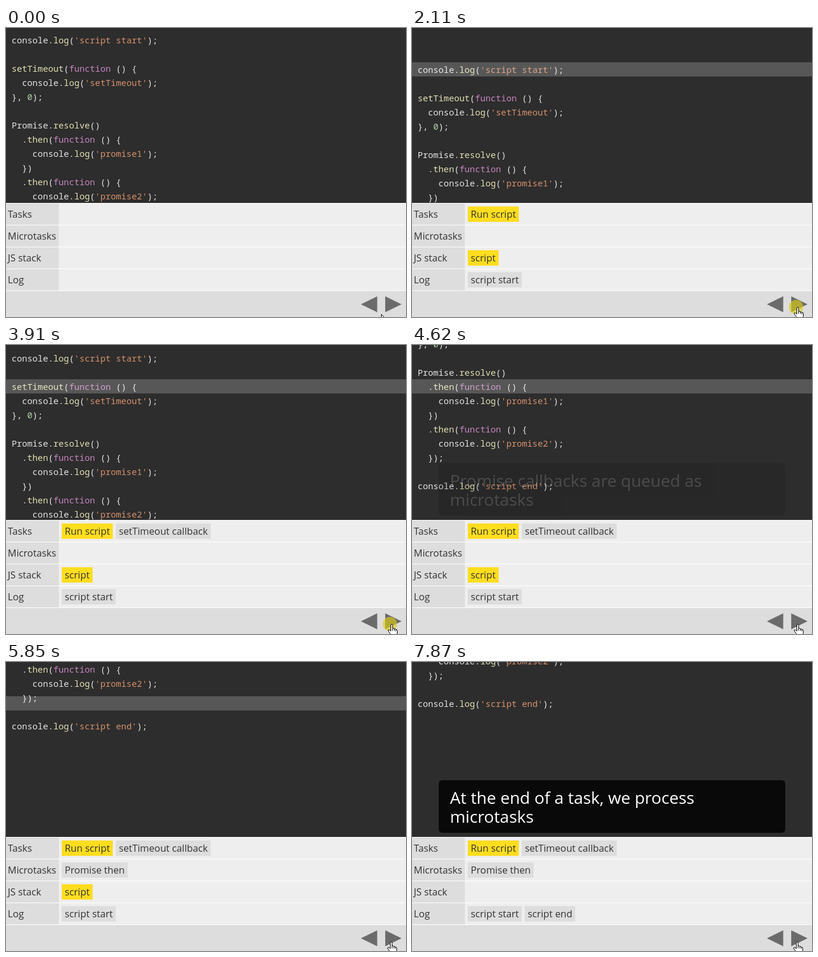
An HTML page that plays this animation: 674 by 489 pixels, repeating every 8 s.

```html
<!DOCTYPE html>
<html lang="en">
<head>
<meta charset="utf-8">
<title>Task queue walkthrough</title>
<style>
html, body { margin: 0; width: 674px; height: 489px; overflow: hidden; background: #ddd; }
body { position: relative; font: 16.25px/26px "Open Sans", sans-serif; color: #333; }
#code { position: absolute; width: 674px; height: 296px; overflow: hidden; background: #2d2d2d; }
pre { position: absolute; left: 9.4px; top: 8px; margin: 0; color: #e4e4e4;
  font: 500 14.667px/24px "Noto Sans Mono", monospace; }
.call { color: #e2e0b4; } .word { color: #c586c0; } .str { color: #d6916c; } .num { color: #b5cea8; }
#bar { position: absolute; top: 58px; width: 674px; height: 24px; background: rgba(255,255,255,.2); }
.row { position: relative; height: 36px; border-top: 1px solid #fff; background: #eee; white-space: nowrap; }
#queues { position: absolute; top: 296px; width: 674px; border-bottom: 1px solid #fff; }
.row b { position: absolute; width: 86px; height: 26px; padding: 5px 0 5px 3px; background: #ddd; font-weight: 400; }
.chips { position: absolute; left: 94px; top: 5px; display: flex; gap: 5px; }
.chips span { padding: 0 5px; background: #ddd; }
.chips .on { background: #ffdd1f; }
.note { position: absolute; left: 45px; top: 200px; width: 546px; height: 64px; padding: 12.5px 19px;
  border-radius: 6px; background: rgba(0,0,0,.8); color: #fff; font-size: 28px; line-height: 32px; white-space: pre; }
.note.single { left: 50px; top: 216px; width: 536px; height: 32px; }
svg { position: absolute; left: 0; top: 0; }
</style>
</head>
<body>
<div id="code">
<pre id="script">console.log('script start');

setTimeout(function () {
  console.log('setTimeout');
}, 0);

Promise.resolve()
  .then(function () {
    console.log('promise1');
  })
  .then(function () {
    console.log('promise2');
  });

console.log('script end');</pre>
<div id="bar" data-in="715" data-out="6985"></div>
</div>
<div id="queues">
  <div class="row"><b>Tasks</b><div class="chips"><span class="on" data-in="715">Run script</span><span data-in="3400">setTimeout callback</span></div></div>
  <div class="row"><b>Microtasks</b><div class="chips"><span data-in="5120">Promise then</span></div></div>
  <div class="row"><b>JS stack</b><div class="chips"><span class="on" data-in="715" data-out="6985">script</span></div></div>
  <div class="row"><b>Log</b><div class="chips"><span data-in="1530">script start</span><span data-in="6290">script end</span></div></div>
</div>
<div class="note single" data-in="2795" data-out="3400">setTimeout callbacks are queued as tasks</div>
<div class="note" data-in="4590" data-out="5120">Promise callbacks are queued as
microtasks</div>
<div class="note" data-in="7605">At the end of a task, we process
microtasks</div>
<svg width="674" height="489">
  <path fill="#6b6b6b" d="M598 467.500L625.500 454V481zM666.500 467.500L639 454V481z"/>
  <g id="pointer">
    <circle id="click" cx="-1" cy="-1" r="12" fill="rgb(220,205,20)" fill-opacity=".65"/>
    <path id="arrow" fill="#fff" stroke="#000" d="M.5.5V16.500L4.500 13L7 18.500L9.500 17.500L7 12H12z"/>
    <path id="hand" transform="translate(-5 -1)" fill="#fff" stroke="#000" stroke-linejoin="round"
      d="M5.500 12V2.500q0-2 1.500-2t1.500 2V7.500q3-.8 3 1q2.500-.7 2.500 1q2.500-.3 2.500 2V15l-2 4v2.500H6.500V19L2 13q-2-2.500-.5-3q2-.5 4 2zM8.500 7.500v4M11.500 8.500v3M14 9.500v3"/>
  </g>
</svg>
<script>
const LOOP = 8000;
const $ = id => document.getElementById(id);
const ramp = (t, start, length) => Math.min(1, Math.max(0, (t - start) / length));

// start time and final offset of each scroll
const scrolls = [[755, 50], [2195, 2], [4040, -118], [5709, -286]];
// time and duration of each click flash
const clicks = [[630, 80], [1490, 70], [2110, 80], [2750, 70], [3360, 70], [3910, 150],
  [4550, 70], [5080, 70], [5630, 75], [6250, 70], [6940, 70], [7560, 70]];

// cubic-bezier(.25, .1, .25, 1)
function ease(x) {
  let low = 0, high = 1;
  for (let i = 0; i < 20; i++) {
    const s = (low + high) / 2;
    if (.75 * s * (1 - s) + s ** 3 < x) low = s; else high = s;
  }
  return .3 * low * (1 - low) ** 2 + 3 * low * low * (1 - low) + low ** 3;
}

$('script').innerHTML = $('script').textContent.replace(
  /('[^']*')|\b(function)\b|(\w+)(?=\()|\b(\d+)\b/g,
  (text, str, word, call) =>
    `<span class="${str ? 'str' : word ? 'word' : call ? 'call' : 'num'}">${text}</span>`);

const faders = [...document.querySelectorAll('[data-in]')].map(el => ({
  el, start: +el.dataset.in, end: +el.dataset.out || Infinity,
  length: el.className.startsWith('note') ? 220 : 180
}));

function draw(t) {
  for (const { el, start, end, length } of faders)
    el.style.opacity = ramp(t, start, length) * (1 - ramp(t, end, 180));

  const y = scrolls.reduce((from, [start, to]) =>
    from + (to - from) * ease(ramp(t, start, 300)), 0);
  $('script').style.transform = `translateY(${Math.round(y)}px)`;

  const move = ramp(t, 0, 470);
  const px = Math.round(632 + 16 * move) - (t >= 5630);
  const py = Math.round(484 - 11 * move) + (t >= 5080);
  const overButton = px > 637;
  $('pointer').setAttribute('transform', `translate(${px} ${py})`);
  $('hand').style.display = overButton ? '' : 'none';
  $('arrow').style.display = overButton ? 'none' : '';
  $('click').style.display = clicks.some(([at, length]) => t >= at && t < at + length) ? '' : 'none';
}

const begin = performance.now();
function tick() {
  draw((performance.now() - begin) % LOOP);
  requestAnimationFrame(tick);
}
tick();
</script>
</body>
</html>
```
